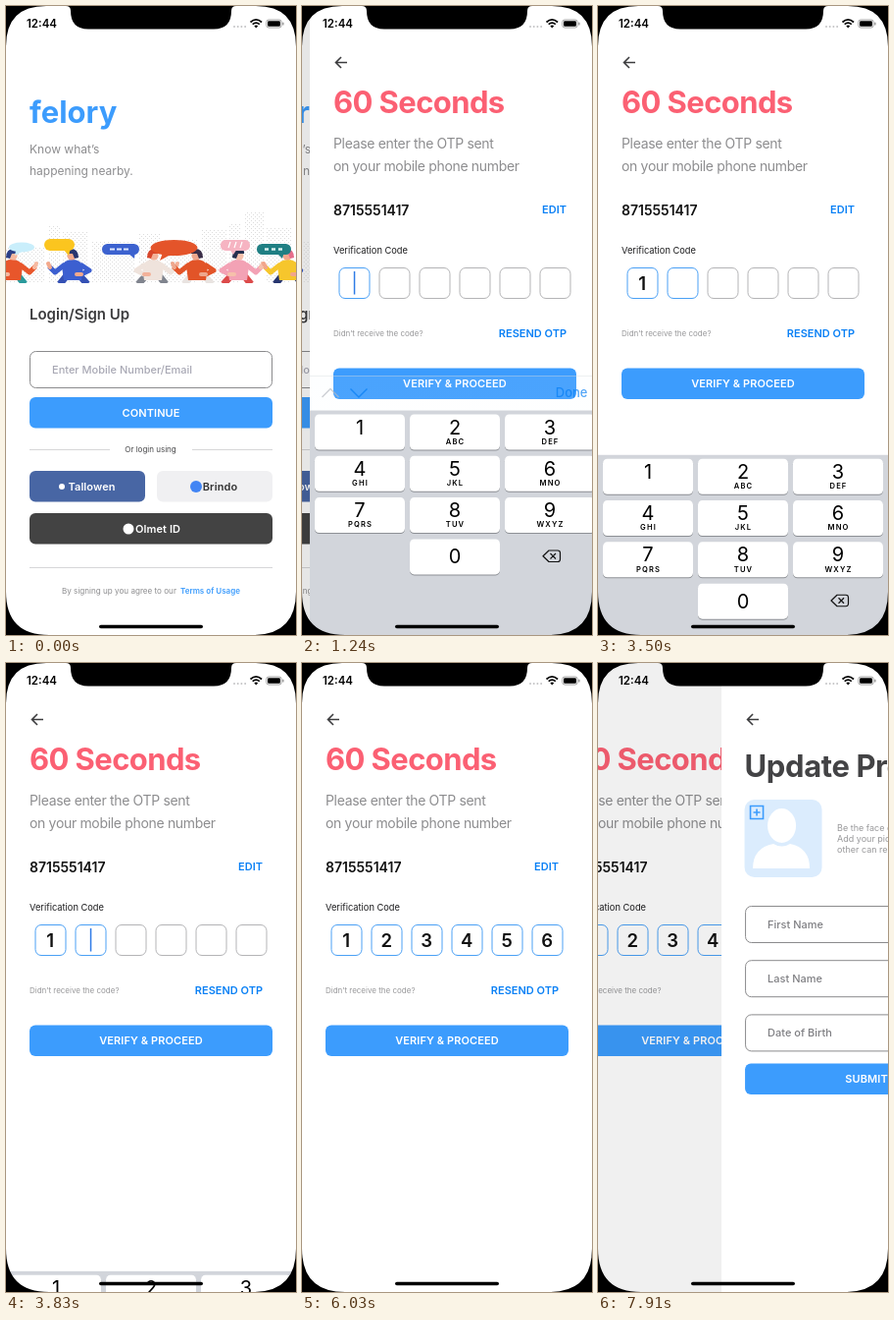
Write an HTML page that moves like this. It is 296 px wide and 640 px high and loops after 8 s.

```html
<!DOCTYPE html>
<html lang="en">
<head>
<meta charset="utf-8">
<title>Sign-up flow</title>
<style>
  html, body { margin: 0; width: 100%; height: 100%; overflow: hidden; background: #000; }
  svg { display: block; width: 296px; height: 640px; }
  text { font-family: Inter, Roboto, sans-serif; font-optical-sizing: none; white-space: pre; }
</style>
</head>
<body>
<svg id="stage" viewBox="0 0 296 640" xmlns="http://www.w3.org/2000/svg">
  <defs>
    <pattern id="grain" width="4" height="4" patternUnits="userSpaceOnUse">
      <path d="M0 0h1v1h-1zM2 2h1v1h-1z" fill="#dcdcdc"/>
    </pattern>
    <linearGradient id="tint" x2="0" y2="1">
      <stop stop-color="#e6f3fd"/><stop offset="1" stop-color="#f2f7fa"/>
    </linearGradient>
    <clipPath id="banner"><path d="M0 205H296V282H0z"/></clipPath>
  </defs>
</svg>
<script>
const LOOP = 8000, W = 296;
const BLUE = '#3c9cfd', LINK = '#0a80f5', INK = '#3c3c3e', GREY = '#8d8d8f';
const stage = document.getElementById('stage');

function el(parent, tag, attrs = {}) {
  const node = document.createElementNS('http://www.w3.org/2000/svg', tag);
  for (const key in attrs) node.setAttribute(key, attrs[key]);
  parent.appendChild(node);
  return node;
}
const group = (parent, attrs) => el(parent, 'g', attrs);
const rect = (g, x, y, width, height, rx, fill, more) =>
  el(g, 'rect', { x, y, width, height, rx, fill, ...more });
const dot = (g, cx, cy, r, fill) => el(g, 'circle', { cx, cy, r, fill });
const oval = (g, cx, cy, rx, ry, fill) => el(g, 'ellipse', { cx, cy, rx, ry, fill });
const shape = (g, d, fill) => el(g, 'path', { d, fill });
const line = (g, d, stroke, width = 1, more) =>
  el(g, 'path', { d, stroke, 'stroke-width': width, fill: 'none', ...more });

function label(g, x, y, str, size, weight, fill, more = {}) {
  const node = el(g, 'text', { x, y, 'font-size': size, 'font-weight': weight, fill, ...more });
  node.textContent = str;
  return node;
}
const MID = { 'text-anchor': 'middle' };

function button(g, x, y, w, fill, str, color = '#fff', tx = x + w / 2) {
  rect(g, x, y, w, 31.5, 6, fill);
  if (str) label(g, tx, y + 19.5, str, 11, 600, color, { ...MID, 'letter-spacing': .1 });
}
function field(g, y, hint, color) {
  rect(g, 24.5, y + .5, 247, 37, 6, '#fff', { stroke: '#8b8b8d' });
  label(g, 47, y + 22.5, hint, 11, 500, color);
}
function backArrow(g) {
  line(g, 'M38 57.5H26.5M32 52L26.5 57.5L32 63', '#3c3c3e', 1.6);
}
function screen() {
  const g = group(stage);
  rect(g, 0, 0, W, 640, 0, '#fff');
  return g;
}
const shade = g => rect(g, 0, 0, W, 640, 0, '#000', { opacity: 0 });

// --- Login ---
function drawPerson(g, x, coat, legs, skin, hair, dir) {
  const p = group(g, { transform: `translate(${x} 251) scale(${dir} 1)` });
  line(p, 'M-6 22L-15 32M5 22L13 32', legs, 7, { 'stroke-linejoin': 'round' });
  shape(p, 'M-11 14Q-8 7 0 7Q9 7 11 14L9 28H-9z', coat);
  line(p, 'M8 12L18 20L24 14M-8 12L-17 18L-9 22', coat, 5, { 'stroke-linejoin': 'round' });
  line(p, 'M-9 22L-4 22M23 15L25 11', skin, 4, { 'stroke-linecap': 'round' });
  dot(p, 1, 3, 4.6, skin);
  shape(p, 'M-6 5Q-6 -4 2 -4Q7 -3 6 1L0 1L-2 6z', hair);
}
function drawBanner(g) {
  const b = group(g, { 'clip-path': 'url(#banner)' });
  for (const [x, y, w] of [[0, 246, 40], [44, 224, 12], [58, 230, 26], [88, 240, 44], [136, 232, 22],
    [162, 238, 34], [200, 228, 26], [228, 222, 12], [243, 210, 20], [266, 226, 26]])
    rect(b, x, y, w, 60, 0, 'url(#grain)');

  drawPerson(b, 6, '#e8562b', '#2a9a9c', '#f6b9a0', '#2b3f86', 1);
  drawPerson(b, 68, '#3c5fd0', '#3450b4', '#f3a98c', '#27356f', -1);
  drawPerson(b, 150, '#efe3dc', '#80848e', '#f3b199', '#d8452a', 1);
  drawPerson(b, 195, '#e25428', '#e9e3e0', '#eea78d', '#3a2e48', -1);
  drawPerson(b, 237, '#f3a2b5', '#dc4a4a', '#f6c0ab', '#26304f', 1);
  drawPerson(b, 288, '#f6c62c', '#27356f', '#f2a68c', '#e66d8a', -1);

  oval(b, 16, 245.5, 13, 5, '#c9eefb');
  shape(b, 'M10 249L9 254L16 250z', '#c9eefb');
  rect(b, 39, 237, 31, 12, 6, '#fbc51f');
  shape(b, 'M58 247L64 254L66 246z', '#fbc51f');
  rect(b, 98, 242, 38, 11, 5.5, '#3c62cf');
  shape(b, 'M124 251L131 257L132 249z', '#3c62cf');
  line(b, 'M106 247.5H126', '#dfe8ff', 2, { 'stroke-dasharray': '5 2' });
  oval(b, 171.5, 246, 24, 8, '#e4542a');
  shape(b, 'M160 251L157 259L168 253z', '#e4542a');
  rect(b, 219, 238, 30, 11, 5, '#f6b4c2');
  shape(b, 'M228 247L232 253L236 247z', '#f6b4c2');
  line(b, 'M227 246L229 240M233 246L235 240M239 246L241 240', '#fff', 1.2);
  rect(b, 256, 242, 35, 11, 5.5, '#1f7f83');
  shape(b, 'M276 251L282 257L284 250z', '#1f7f83');
  line(b, 'M264 247.5H283', '#d7f0ee', 2.4, { 'stroke-dasharray': '4 3' });
}

const login = screen();
label(login, 24, 119, 'felory', 31, 700, BLUE);
label(login, 24, 150, 'Know what’s', 12, 400, GREY);
label(login, 24, 171.5, 'happening nearby.', 12, 400, GREY);
drawBanner(login);
label(login, 24, 319, 'Login/Sign Up', 15, 600, INK);
field(login, 351, 'Enter Mobile Number/Email', '#a8a8b4');
button(login, 24, 398, 248, BLUE, 'CONTINUE');
line(login, 'M24 451.5H106M190 451.5H272M24 571.5H272', '#d6d6d8');
label(login, 147.5, 454.3, 'Or login using', 8, 400, '#48484a', MID);
button(login, 24, 473, 118, '#4866a4', 'Tallowen', '#fff', 87.5);
dot(login, 57, 489, 3, '#fff');
button(login, 154, 473, 118, '#f0f0f2', 'Brindo', '#333', 218.5);
dot(login, 194, 489, 6, '#4285f4');
button(login, 24, 516, 248, '#434343', 'Olmet ID', '#fff', 155);
dot(login, 125, 532, 5.5, '#fff');
label(login, 57, 598, 'By signing up you agree to our', 8.1, 400, GREY);
label(login, 178, 598, 'Terms of Usage', 8, 600, BLUE);
const loginShade = shade(login);

// --- One-time code ---
const otp = screen();
backArrow(otp);
label(otp, 24, 108.5, '60 Seconds', 31, 700, '#fb6073', { 'letter-spacing': -.6 });
label(otp, 24, 145, 'Please enter the OTP sent', 14, 400, GREY, { 'letter-spacing': -.33 });
label(otp, 24, 168, 'on your mobile phone number', 14, 400, GREY, { 'letter-spacing': -.33 });
label(otp, 24, 212.5, '8715551417', 14, 600, '#111');
label(otp, 262, 211, 'EDIT', 11, 600, LINK, { 'text-anchor': 'end' });
label(otp, 24, 252, 'Verification Code', 9.3, 400, '#1c1c1e');
label(otp, 24, 336, 'Didn’t receive the code?', 8, 400, '#98989a');
label(otp, 262, 337, 'RESEND OTP', 11, 600, LINK, { 'text-anchor': 'end' });
button(otp, 24, 368.5, 248, BLUE, 'VERIFY & PROCEED');

const cells = [...'123456'].map((digit, i) => {
  const x = 30 + 41 * i;
  return {
    box: rect(otp, x, 266.5, 31, 31, 6, '#fff'),
    digit: label(otp, x + 15.2, 289, digit, 18.5, 600, '#111', MID)
  };
});
const caret = rect(otp, 44.8, 270, 1.5, 23.5, 0, '#2f7be6');

const board = group(otp);
rect(board, 0, 411.5, W, 260, 0, '#d2d5db');
const letters = ['', 'ABC', 'DEF', 'GHI', 'JKL', 'MNO', 'PQRS', 'TUV', 'WXYZ'];
function key(col, row, digit, caption) {
  const x = 5 + 97 * col, y = 415.5 + 42.3 * row;
  rect(board, x, y + 1, 92, 36, 4.5, '#8d9095');
  rect(board, x, y, 92, 36, 4.5, '#fff');
  label(board, x + 46, y + (row < 3 ? 20 : 25), digit, 20, 400, '#000', MID);
  label(board, x + 46.5, y + 30.3, caption, 7.6, 600, '#000', { ...MID, 'letter-spacing': 1.1 });
}
letters.forEach((caption, i) => key(i % 3, Math.floor(i / 3), i + 1, caption));
key(1, 3, 0, '');
line(board, 'M244 554H253Q255.500 554 255.500 556.500V563Q255.500 565.500 253 565.500H244L238 559.700zM245.500 557L251 562.500M251 557L245.500 562.500',
  '#111', 1.2, { 'stroke-linejoin': 'round' });

const bar = group(otp);
const barFill = rect(bar, 0, 0, W, 36, 0, '#f7f9fa');
line(bar, 'M0 .5H296', '#d5dade', .6);
const up = line(bar, 'M12.500 22L21 13.500L29.500 22', LINK, 1.4);
line(bar, 'M41.500 13.500L50 22L58.500 13.500', LINK, 1.4);
label(bar, 283.5, 22, 'Done', 13, 500, LINK, { 'text-anchor': 'end' });
const otpShade = shade(otp);

// --- Profile ---
const profile = screen();
backArrow(profile);
label(profile, 23.5, 116, 'Update Profile', 31, 700, '#434345', { 'letter-spacing': -.4 });
rect(profile, 23.5, 139, 79, 79, 10, '#dbecfd');
oval(profile, 61.5, 165.5, 14.5, 17.5, '#fff');
shape(profile, 'M32 209Q32 188 53 184Q61.500 189 70 184Q90 188 90 209z', '#fff');
line(profile, 'M29.500 145.500H42.500V158.500H29.500zM36 148.500V155.500M32.500 152H39.500', BLUE, 1.6);
['Be the face of your', 'Add your picture so', 'other can recognise'].forEach((str, i) =>
  label(profile, 118, 171 + 11 * i, str, 9, 400, '#98989a'));
['First Name', 'Last Name', 'Date of Birth'].forEach((hint, i) =>
  field(profile, 247 + 55.2 * i, hint, '#7f7f83'));
button(profile, 24, 407.5, 248, BLUE, 'SUBMIT');

// --- Phone frame and status bar ---
const frame = group(stage);
shape(frame, 'M0 0H41Q0 0 0 41zM296 0H255Q296 0 296 41zM0 640V596Q0 640 44 640zM296 640V596Q296 640 252 640z', '#000');
shape(frame, 'M61 0Q66 0 66 5Q66 23.500 84 23.500H212Q230 23.500 230 5Q230 0 235 0z', '#000');
label(frame, 21, 22, '12:44', 11.5, 600, '#000');
for (let i = 0; i < 4; i++) dot(frame, 233 + 3.7 * i, 21, 1, '#c4c4c6');
line(frame, 'M249.500 16.500Q255.200 11.300 261 16.500M251.700 18.700Q255.200 15.500 258.800 18.700', '#000', 1.7);
shape(frame, 'M253.300 20.300Q255.200 18.700 257.200 20.300L255.200 22.500z', '#000');
rect(frame, 265.8, 14, 15.4, 8, 2.4, 'none', { stroke: '#8a8a8a', 'stroke-width': .8 });
rect(frame, 267, 15.2, 13, 5.6, 1.4, '#000');
rect(frame, 282.3, 16.5, 1.2, 3, .6, '#8a8a8a');
rect(frame, 95, 629.7, 106, 3.6, 1.8, '#000');

// --- Timing ---
// The screen refreshes only at these moments.
const ticks = [0, 500, 1100, 1240, 1380, 1520, 1620, 1930, 2470, 2590, 2830, 2950, 3320, 3500,
  3620, 3740, 3850, 3960, 4070, 4180, 4290, 4790, 4910, 5030, 5230, 5560, 5680, 5800, 5910,
  6030, 7490, 7800, 7910];
const typed = [3500, 3850, 4070, 5230, 5560, 5800];
const caretSteps = [[0, 1], [1930, 0], [2470, 1], [2830, .5], [2950, 0], [3320, 1], [3500, 0],
  [3620, 1], [4290, 0], [4790, 1], [5030, 0], [5230, 1], [5800, 0]];

const settle = (t, start, rate) => {
  const u = Math.max(0, t - start) * rate;
  return 1 - Math.exp(-u) * (1 + u);
};
const ramp = (t, a, b) => Math.min(1, Math.max(0, (t - a) / (b - a)));
const ease = u => 1 - (1 - u) ** 2;
const move = (g, x, y = 0) => g.setAttribute('transform', `translate(${x.toFixed(2)} ${y.toFixed(2)})`);
const show = (node, a) => node.setAttribute('opacity', a);

function render(t) {
  const first = settle(t, 950, .0189), second = settle(t, 7808, .0189);
  move(login, -.3 * W * first);
  move(otp, W * (1 - first) - .3 * W * second);
  move(profile, W * (1 - second));
  show(loginShade, .1 * first);
  show(otpShade, .1 * second);

  const count = typed.filter(s => s <= t).length;
  cells.forEach((cell, i) => {
    show(cell.digit, i < count ? 1 : 0);
    cell.box.setAttribute('stroke', i <= count ? '#4aa0f5' : '#b4b4b6');
  });
  caret.setAttribute('x', 44.8 + 41 * Math.min(count, 5));
  show(caret, caretSteps.filter(s => s[0] <= t).pop()[1]);

  move(board, 0, 235 * settle(t, 3433, .012));
  const docked = t < 3500;
  const rise = ease(ramp(t, 3740, 4070)) - ease(ramp(t, 5560, 6030));
  move(bar, 0, docked ? 376 : 641 - 36 * rise);
  show(bar, docked ? .7 + .3 * ramp(t, 1240, 1520) : 1);
  show(barFill, docked ? .12 + .88 * ramp(t, 1240, 1520) : 1);
  barFill.setAttribute('fill', docked ? 'url(#tint)' : '#f7f9fa');
  up.setAttribute('stroke', count ? LINK : '#b9bec4');
}

function play(now) {
  const t = now % LOOP;
  render(ticks.filter(s => s <= t).pop());
  requestAnimationFrame(play);
}
render(0);
requestAnimationFrame(play);
</script>
</body>
</html>
```
